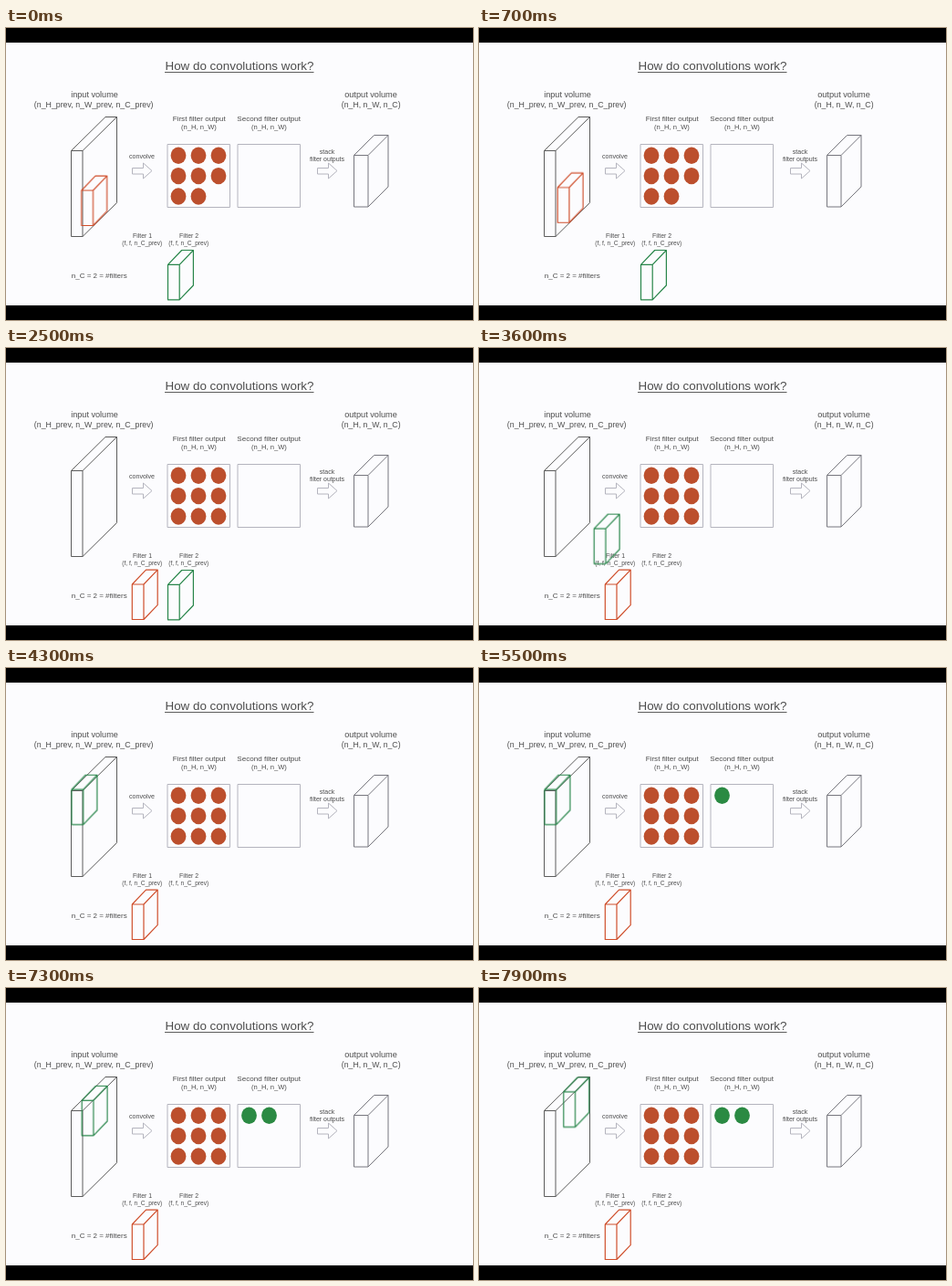
Write an HTML page that moves like this. It is 512 px wide and 320 px high and loops after 8000 ms.

```html
<!DOCTYPE html>
<html lang="en">
<head>
<meta charset="utf-8">
<title>How do convolutions work?</title>
<style>
  html, body { margin: 0; width: 100%; height: 100%; overflow: hidden; background: #000; }
  svg { display: block; width: 512px; height: 320px; }
  text { font-family: "Liberation Sans", Arial, sans-serif; fill: #4c4c4c; text-anchor: middle; }
  .line { fill: none; stroke: #5c5c5c; stroke-width: 1; stroke-linejoin: round; }
  .soft { stroke: #77777f; }
  .pale { stroke: #b4b4be; }
  .orange { stroke: #cf4e2b; stroke-width: 1.2; }
  .green { stroke: #278549; stroke-width: 1.2; }

  .move { animation: 8s infinite ease-in-out; }
  #filter1 { animation-name: filter1; }
  #filter2 { animation-name: filter2; }
  .pop { animation: 8s infinite step-end; }
  #last { animation-name: last; }
  #first { animation-name: first; }
  #second { animation-name: second; }

  @keyframes filter1 {
    0%, 5.625% { transform: translate(-55.5px, -81px); }
    13.75%, 23.125% { transform: translate(-44.8px, -91.5px); }
    30.625%, 100% { transform: none; }
  }
  @keyframes filter2 {
    0%, 38% { transform: none; }
    52.25%, 69% { transform: translate(-105.5px, -126.3px); }
    77%, 90.625% { transform: translate(-94.5px, -136px); }
    98.125%, 100% { transform: translate(-84.7px, -145.5px); }
  }
  @keyframes last { 0% { opacity: 0; } 18.75%, 100% { opacity: 1; } }
  @keyframes first { 0% { opacity: 0; } 61.875%, 100% { opacity: 1; } }
  @keyframes second { 0% { opacity: 0; } 84.375%, 100% { opacity: 1; } }
</style>
</head>
<body>
<svg id="stage" viewBox="0 0 512 320">
  <rect width="512" height="320"/>
  <rect y="16" width="512" height="288" fill="#fcfcfe"/>
</svg>
<script>
  const stage = document.getElementById('stage');

  function add(tag, attrs, content) {
    const el = document.createElementNS('http://www.w3.org/2000/svg', tag);
    for (const key in attrs) el.setAttribute(key, attrs[key]);
    if (content) el.textContent = content;
    stage.append(el);
  }

  const label = (x, y, size, content) => add('text', { x, y, 'font-size': size }, content);

  // Cuboid seen from the front left: front face, top face, right face.
  function box(x, y, w, h, dx, dy, cls, id = '') {
    const d = `M${x} ${y}h${w}v${h}h${-w}z` +
      `l${dx} ${-dy}h${w}l${-dx} ${dy}` +
      `M${x + w + dx} ${y - dy}v${h}l${-dx} ${dy}`;
    add('path', { d, class: 'line ' + cls, ...(id && { id }) });
  }

  const arrow = x => add('path', {
    d: `M${x} 153.5h12v-5.5l9.5 8.5l-9.5 8.5v-5h-12z`, class: 'line pale'
  });

  const dot = (cx, cy, fill, id) => add('ellipse', {
    cx, cy, rx: 8.4, ry: 9.2, fill, ...(id && { id, class: 'pop' })
  });

  label(256, 46.3, 13.4, 'How do convolutions work?');
  add('path', { d: 'M174 48.5H337.5', class: 'line' });

  label(97, 76, 9.15, 'input volume');
  label(96.2, 87, 8.8, '(n_H_prev, n_W_prev, n_C_prev)');
  label(400, 76, 9.2, 'output volume');
  label(400.2, 87, 8.7, '(n_H, n_W, n_C)');
  label(211.7, 102.3, 8.1, 'First filter output');
  label(288.2, 102.3, 8.1, 'Second filter output');
  label(211.5, 110.5, 7.6, '(n_H, n_W)');
  label(288.5, 110.5, 7.6, '(n_H, n_W)');
  label(149, 142.6, 7.1, 'convolve');
  label(352, 138.3, 7, 'stack');
  label(352, 145.6, 7, 'filter outputs');
  label(149.5, 230, 6.9, 'Filter 1');
  label(200.5, 230, 6.9, 'Filter 2');
  label(149.3, 238.3, 6.6, '(f, f, n_C_prev)');
  label(200.3, 238.3, 6.6, '(f, f, n_C_prev)');
  label(102.2, 274, 8, 'n_C = 2 = #filters');

  box(71.5, 134.5, 12.5, 94, 37.5, 37, '');
  box(381.5, 139.5, 15.5, 56.5, 22, 22, 'soft');
  arrow(138.5);
  arrow(341.5);

  for (const x of [177, 254])
    add('rect', { x, y: 127.5, width: 68.5, height: 69, class: 'line pale' });

  for (let i = 0; i < 9; i++)
    dot(189 + 22 * (i % 3), 139.7 + 22.4 * Math.floor(i / 3), '#bc4f2d', i === 8 && 'last');
  dot(266.5, 139.7, '#2b8a43', 'first');
  dot(288.5, 139.7, '#2b8a43', 'second');

  box(138.3, 259, 12.7, 38.5, 15.2, 15.8, 'orange move', 'filter1');
  box(177.5, 259.3, 12.7, 38.5, 15.2, 15.8, 'green move', 'filter2');
</script>
</body>
</html>
```
